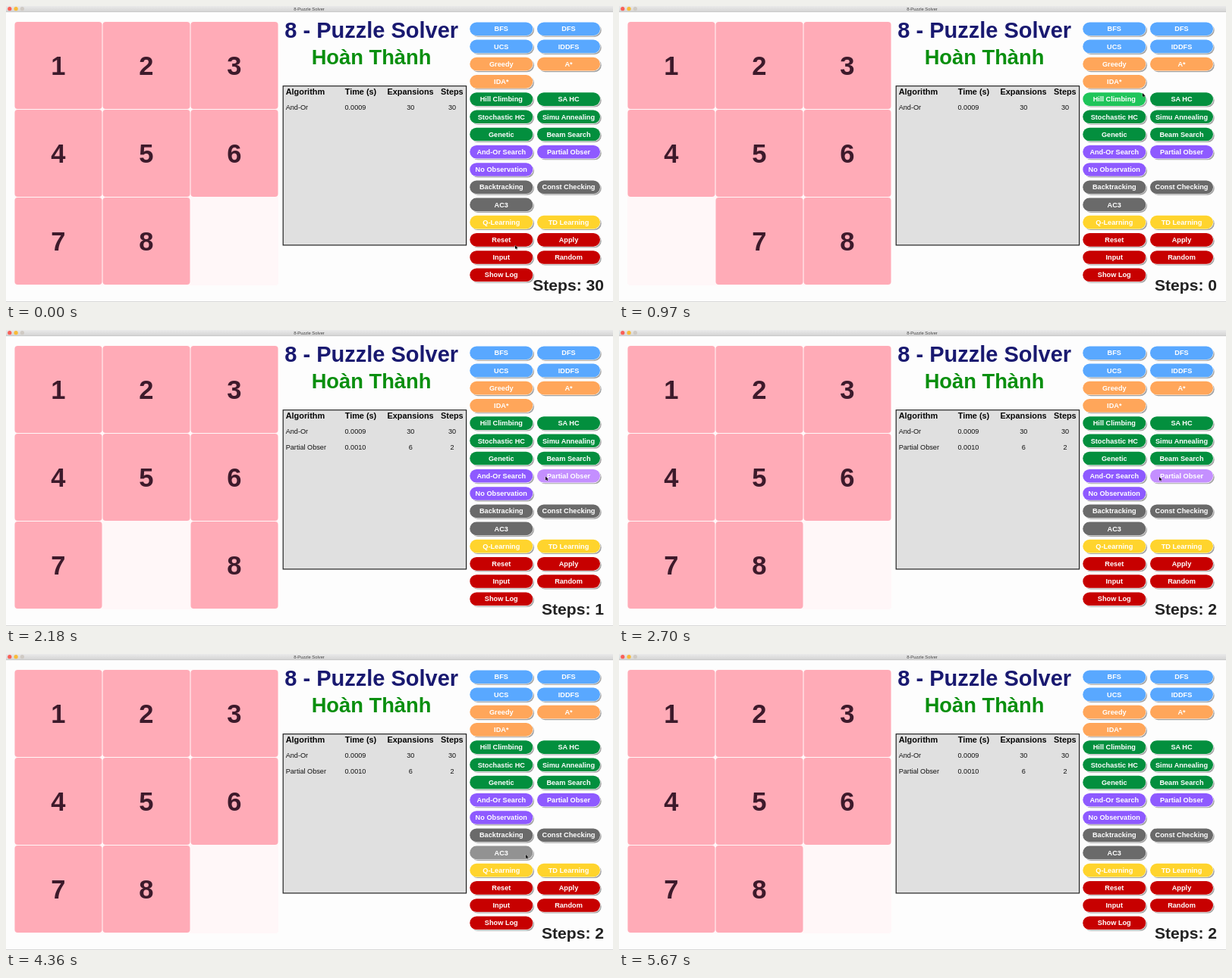
These frames come from a looping animation (800x391 px, 5700 ms). An HTML page:

```html
<!DOCTYPE html>
<html lang="vi">
<head>
<meta charset="utf-8">
<title>8-Puzzle Solver</title>
<style>
  html, body { margin: 0; width: 100%; height: 100%; overflow: hidden; background: #fdfdfd; }
  svg { display: block; width: 100%; height: 100%; }
  text { font-family: "Liberation Sans", Arial, sans-serif; }
</style>
</head>
<body>
<svg id="stage" viewBox="0 0 800 391">
  <defs>
    <linearGradient id="bar" x2="0" y2="1">
      <stop offset="0" stop-color="#eaeaea"/>
      <stop offset="1" stop-color="#d3d3d3"/>
    </linearGradient>
  </defs>
</svg>
<script>
const LOOP = 5700;
const stage = document.getElementById('stage');

function add(tag, attrs, parent = stage) {
  const el = document.createElementNS('http://www.w3.org/2000/svg', tag);
  for (const key in attrs) el.setAttribute(key, attrs[key]);
  parent.appendChild(el);
  return el;
}

function label(str, x, y, size, fill, { anchor = 'middle', bold = true, parent = stage } = {}) {
  const el = add('text', {
    x, y, fill, 'font-size': size, 'text-anchor': anchor,
    'font-weight': bold ? 700 : 400
  }, parent);
  el.textContent = str;
  return el;
}

// Window frame
add('rect', { width: 800, height: 391, fill: '#fdfdfd' });
add('rect', { width: 800, height: 8, fill: 'url(#bar)' });
add('rect', { y: 7.5, width: 800, height: 0.6, fill: '#bdbdbd' });
add('rect', { y: 390, width: 800, height: 1, fill: '#d8d8d8' });
['#f95f57', '#f8bb38', '#cfcac4'].forEach((fill, i) =>
  add('circle', { cx: 4.8 + i * 8.3, cy: 3.7, r: 2.6, fill }));
label('8-Puzzle Solver', 399.5, 5.8, 5.8, '#454545', { bold: false });

// Board
const PITCH = 116;
add('rect', { x: 11, y: 20.5, width: 348, height: 348.5, rx: 4, fill: '#fff7f8' });
const tiles = Array.from({ length: 8 }, (_, i) => {
  const tile = add('g', {});
  add('rect', { x: 0.5, y: 0.5, width: 115, height: 115, rx: 4, fill: '#ffabb7' }, tile);
  label(i + 1, 57.8, 70.4, 34.5, '#3d1a2b', { parent: tile });
  return tile;
});

function placeTiles(order) {
  [...order].forEach((n, cell) => {
    if (n === '0') return;
    const x = 11 + (cell % 3) * PITCH, y = 20.4 + Math.floor(cell / 3) * PITCH;
    tiles[n - 1].setAttribute('transform', `translate(${x} ${y})`);
  });
}

// Headings and results table
label('8 - Puzzle Solver', 481.7, 41.7, 29, '#191970');
label('Hoàn Thành', 481.5, 77, 27.3, '#0a8f0f');
add('rect', { x: 365.2, y: 105.7, width: 241.4, height: 210.2, fill: '#e0e0e0', stroke: '#222', 'stroke-width': 1.2 });
['Algorithm', 'Time (s)', 'Expansions', 'Steps'].forEach((str, i) =>
  label(str, [368.7, 446.7, 502.5, 573][i], 117.4, 10.9, '#050505', { anchor: 'start' }));

function tableRow(cells, y) {
  const row = add('g', {});
  cells.forEach((str, i) => label(str, [368.7, 446.5, 533.3, 588][i], y, 9.15, '#111',
    { anchor: i < 2 ? 'start' : 'middle', bold: false, parent: row }));
  return row;
}
tableRow(['And-Or', '0.0009', '30', '30'], 136.7);
const newRow = tableRow(['Partial Obser', '0.0010', '6', '2'], 157.8);

// Buttons: [left, right, colour, hover colour]
const BLUE = ['#59a8ff', '#83c3ff'], ORANGE = ['#ffa65a', '#ffc58d'],
  GREEN = ['#038f3e', '#1fc55a'], PURPLE = ['#8e5aff', '#c48fff'],
  GRAY = ['#6a6a6a', '#929292'], YELLOW = ['#ffd42d', '#ffe574'], RED = ['#c70000', '#c70000'];
const rows = [
  ['BFS', 'DFS', BLUE], ['UCS', 'IDDFS', BLUE],
  ['Greedy', 'A*', ORANGE], ['IDA*', '', ORANGE],
  ['Hill Climbing', 'SA HC', GREEN], ['Stochastic HC', 'Simu Annealing', GREEN], ['Genetic', 'Beam Search', GREEN],
  ['And-Or Search', 'Partial Obser', PURPLE], ['No Observation', '', PURPLE],
  ['Backtracking', 'Const Checking', GRAY], ['AC3', '', GRAY],
  ['Q-Learning', 'TD Learning', YELLOW],
  ['Reset', 'Apply', RED], ['Input', 'Random', RED], ['Show Log', '', RED]
];
const buttons = [];
rows.forEach(([left, right, colors], r) => [left, right].forEach((str, c) => {
  if (!str) return;
  const x = 611.3 + c * 88.7, y = 21.4 + r * 23.22;
  const pill = { x, y, width: 83, height: 17.6, rx: 8.8 };
  add('rect', { ...pill, x: x + 1.7, y: y + 1.7, fill: '#a3a3a3' });
  const face = add('rect', { ...pill, stroke: '#fff', 'stroke-width': 1.2, 'paint-order': 'stroke' });
  label(str, x + 41.5, y + 12, 9.2, '#fff');
  buttons.push({ x, y, face, colors });
}));

const steps = label('', 788, 376.2, 21.1, '#222', { anchor: 'end' });
const cursor = add('path', {
  d: 'M0 0V5L1.2 4 2 5.8 2.9 5.4 2.1 3.7H3.7Z',
  fill: '#000', stroke: '#fff', 'stroke-width': 0.5, 'paint-order': 'stroke'
});

// [time, value...] tracks
const states = [
  [0, '123456780', 30], [300, '123456078', 0],
  [2160, '123456708', 1], [2460, '123456780', 2]
];
const ROW_TIME = 2130;
const path = [
  [0, 671, 316], [420, 671, 316], [880, 690, 117], [970, 690, 115], [1110, 690, 115],
  [1560, 710, 193], [2700, 712, 194], [3050, 712, 194], [3360, 701, 208],
  [3800, 694, 236], [4260, 685, 265], [4420, 685, 265], [4720, 668, 20], [4860, 660, -12], [LOOP, 660, -12]
];

function cursorAt(t) {
  const i = path.findIndex(p => p[0] > t);
  const [t0, x0, y0] = path[i - 1], [t1, x1, y1] = path[i];
  const u = (t - t0) / (t1 - t0), k = u * u * (3 - 2 * u);
  return [x0 + (x1 - x0) * k, y0 + (y1 - y0) * k];
}

function draw(t) {
  const [, order, count] = states.filter(s => s[0] <= t).pop();
  placeTiles(order);
  steps.textContent = 'Steps: ' + count;
  newRow.setAttribute('visibility', t >= ROW_TIME ? 'visible' : 'hidden');
  const [px, py] = cursorAt(t);
  cursor.setAttribute('transform', `translate(${px} ${py})`);
  for (const { x, y, face, colors } of buttons) {
    const over = px >= x && px <= x + 83 && py >= y && py <= y + 17.6;
    face.setAttribute('fill', colors[over ? 1 : 0]);
  }
}

const start = performance.now();
function tick() {
  draw((performance.now() - start) % LOOP);
  requestAnimationFrame(tick);
}
tick();
</script>
</body>
</html>
```
